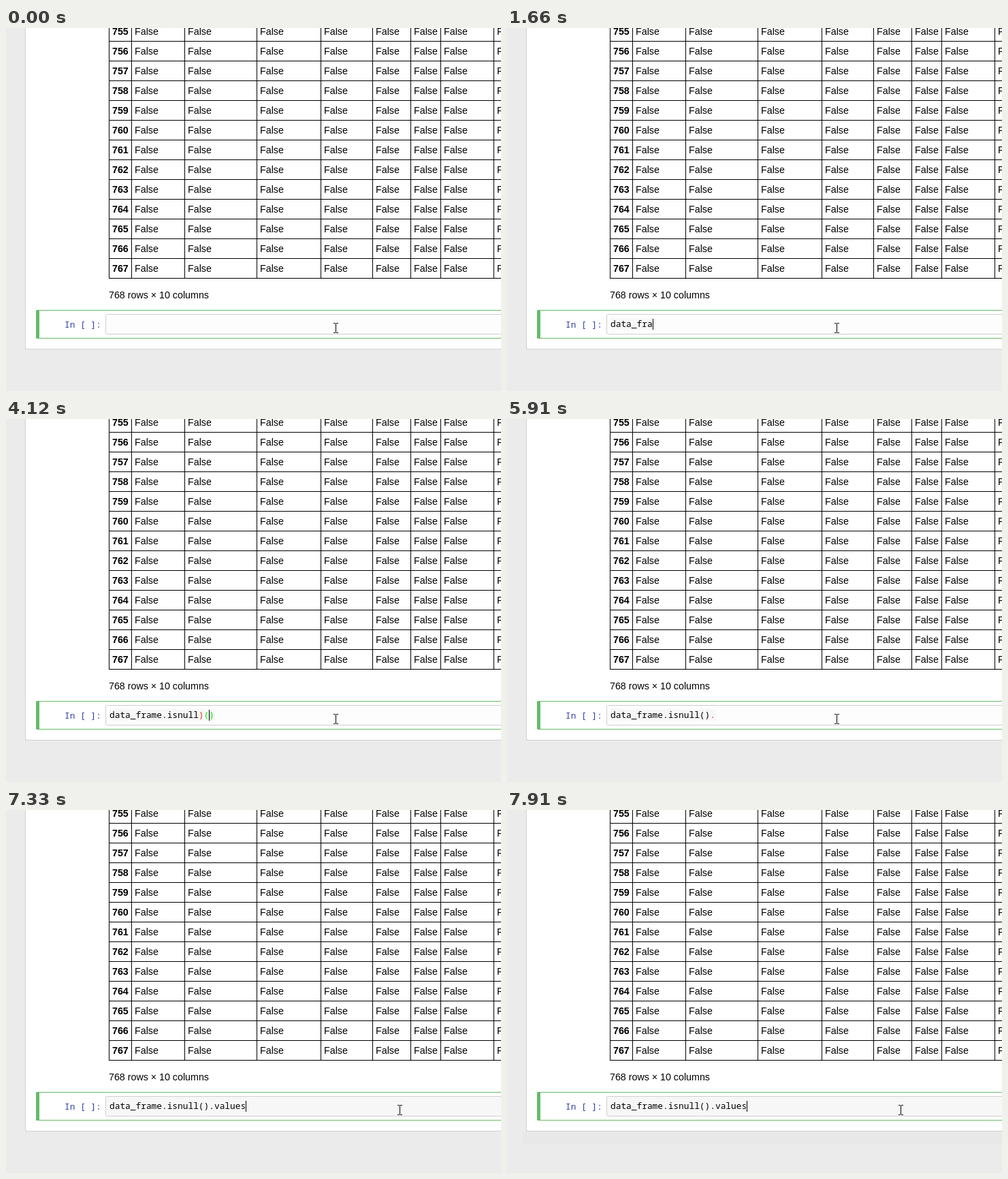
Recreate the animation shown at these times as an HTML page. Size 727x533 px, loop 8 s.

```html
<!DOCTYPE html>
<html lang="en">
<head>
<meta charset="utf-8">
<title>Notebook cell typing</title>
<style>
  html, body { margin: 0; width: 100%; height: 100%; overflow: hidden; background: #ebebeb; }
  svg { display: block; width: 727px; height: 533px; }
  text { white-space: pre; }
  .sans { font: 14.25px "Liberation Sans", Arial, sans-serif; }
  .bold { font-weight: bold; }
  .mono { font: 12.83px "Noto Sans Mono", "DejaVu Sans Mono", monospace; }
  .grid { stroke: #000; fill: none; shape-rendering: crispEdges; }
  .sharp { shape-rendering: crispEdges; }
</style>
</head>
<body>
<svg viewBox="0 0 727 533">
  <rect id="shade" x="24" width="710" fill="#e5e5e5"/>
  <rect id="edge" x="28" y="-10" width="720" rx="2" fill="#d2d2d2"/>
  <rect id="page" x="29" y="-10" width="720" rx="2" fill="#fff"/>
  <g id="table"></g>
  <text class="sans" x="151" y="397">768 rows × 10 columns</text>

  <rect id="cell" x="44.5" y="414.5" width="700" rx="2" fill="#fff" stroke="#66bb6a"/>
  <rect id="bar" x="44" y="414" width="5" rx="1.5" fill="#66bb6a"/>
  <text class="mono" x="86" y="440" fill="#303f9f">In [ ]:</text>
  <rect id="input" x="146.5" y="420.5" width="600" rx="2" stroke="#cfcfcf"/>
  <rect id="patch" class="sharp" x="152" y="426" height="17" fill="#f7f7f7"/>
  <text class="mono" x="152" y="439"><tspan id="plain"></tspan><tspan id="error" fill="#f22"></tspan><tspan id="match" fill="#0e0"></tspan></text>
  <rect id="caret" class="sharp" width="1" height="16"/>
  <path id="mouse" class="sharp" d="M-3 433h3v1h1v-1h3v1h-3v13h3v1h-3v-1h-1v1h-3v-1h3v-13h-3z"/>
</svg>
<script>
const $ = id => document.getElementById(id);
const CODE = "data_frame.isnull().values";
const LEFT = 152, CHAR = 7.7, LOOP = 8000;
const HIDDEN = -1;

// Static table of booleans
const columns = [151, 184, 262, 368, 462, 538, 594, 638, 716];
let markup = "", lines = "";
for (let row = 0; row < 13; row++) {
  const y = 10 + row * 29;
  columns.forEach((x, i) => {
    markup += `<text class="sans${i ? "" : " bold"}" x="${x + 5}" y="${y}">${i ? "False" : 755 + row}</text>`;
  });
  lines += `M151 ${y + 9.5}H727`;
}
columns.forEach(x => lines += `M${x + .5} 0V368`);
$("table").innerHTML = markup + `<path class="grid" d="${lines}"/>`;

// [start, typed characters, extras]
const steps = [
  [0, 0, { caret: HIDDEN }],
  [430, 1], [560, 2], [700, 3], [830, 4],
  [1130, 5], [1260, 6],
  [1530, 7], [1660, 8], [1820, 9],
  [1970, 10, { error: "." }],
  [2520, 10, { error: ".", caret: HIDDEN }],
  [2660, 12], [2800, 13], [2940, 14], [3080, 15],
  [3350, 16], [3510, 17],
  [3970, 17, { error: ")" }],
  [4120, 17, { error: ")", match: "()", caret: 19 }],
  [4550, 17],
  [4950, 17, { match: "()", caret: 18 }],
  [5090, 17, { match: "()" }],
  [5370, 19, { error: "." }],
  [5910, 19, { error: ".", caret: HIDDEN }],
  [6500, 21], [6700, 22],
  [6890, 23, { mouse: HIDDEN }],
  [7190, 25, { mouse: 578, grey: true }],
  [7330, 26, { mouse: 578, grey: true }],
  [7480, 26, { mouse: 578, grey: true, caret: 0, grow: 17, shade: [427, 65, "#e4e4e4"] }],
  [7910, 26, { mouse: 578, grey: true, shade: [472, 19, "#e8e8e8"] }]
];

// Each step keeps the widest tinted strip reached so far
let widest = 0;
const states = steps.map(([start, typed, extra = {}]) => {
  const s = { start, typed, error: "", match: "", mouse: 484, grow: 0, shade: [0, 0, "none"], ...extra };
  const end = typed + s.error.length + s.match.length;
  s.caret = s.caret ?? end;
  widest = Math.max(widest, end ? end * CHAR + 1 : 0);
  return { ...s, strip: Math.round(widest) };
});

const set = (id, attrs) => {
  for (const key in attrs) $(id).setAttribute(key, attrs[key]);
};
const show = (id, on) => set(id, { visibility: on ? "visible" : "hidden" });

function draw(s) {
  const [top, height, fill] = s.shade;
  set("shade", { y: top, height, fill });
  set("edge", { height: 482 + s.grow });
  set("page", { height: 481 + s.grow });
  set("cell", { height: 41 + s.grow });
  set("bar", { height: 42 + s.grow });
  set("input", { height: 29 + s.grow, fill: s.grey ? "#f7f7f7" : "#fdfdfd" });
  set("patch", { width: s.strip });
  $("plain").textContent = CODE.slice(0, s.typed);
  $("error").textContent = s.error;
  $("match").textContent = s.match;
  set("caret", { x: Math.round(LEFT + s.caret * CHAR), y: 427 + s.grow });
  show("caret", s.caret !== HIDDEN);
  set("mouse", { transform: `translate(${s.mouse} 0)` });
  show("mouse", s.mouse !== HIDDEN);
}

let current;
function tick() {
  const time = performance.now() % LOOP;
  const next = states.findLast(s => s.start <= time);
  if (next !== current) draw(current = next);
  requestAnimationFrame(tick);
}
tick();
</script>
</body>
</html>
```
